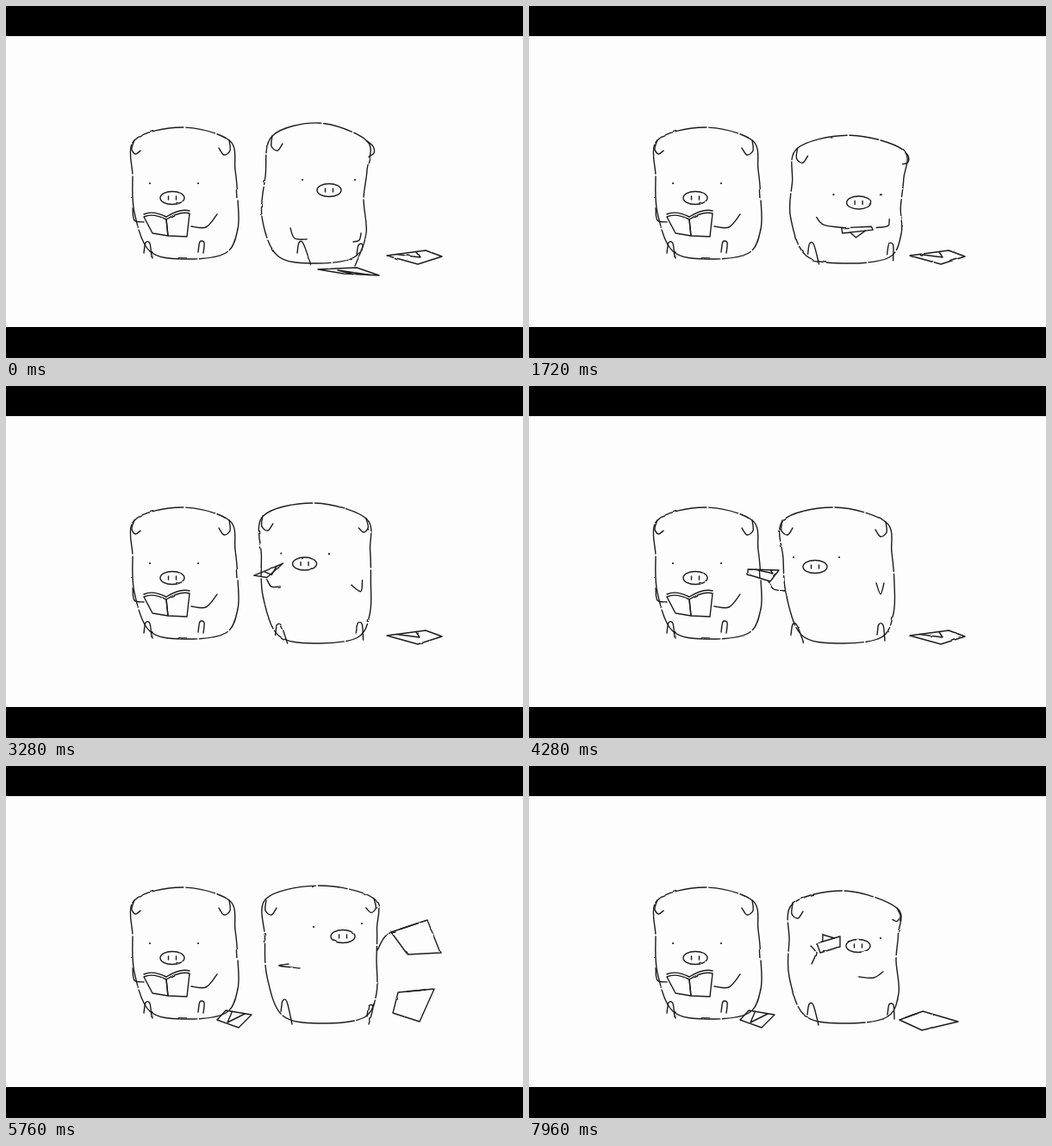
Animation, 600 px wide and 409 px high, one loop 8 s. Source, as an HTML page:

```html
<!DOCTYPE html>
<html lang="en">
<head>
<meta charset="utf-8">
<title>Two pigs and a paper plane</title>
<style>
html, body { margin: 0; width: 100%; height: 100%; overflow: hidden; background: #000; }
svg { display: block; width: 100vw; height: 100vh; }
.ink { fill: none; stroke: #1c1c1c; stroke-width: 1.4; stroke-linecap: round; stroke-linejoin: round; }
.body { stroke-dasharray: 60 3 34 2.6 85 3; }
.dot { fill: #1c1c1c; stroke: none; }
</style>
</head>
<body>
<svg viewBox="0 0 600 409">
  <defs>
    <filter id="rough" filterUnits="userSpaceOnUse" x="0" y="0" width="600" height="409" color-interpolation-filters="sRGB">
      <feTurbulence type="fractalNoise" baseFrequency=".08" numOctaves="2" seed="4"/>
      <feDisplacementMap in="SourceGraphic" scale="2" xChannelSelector="R" yChannelSelector="G"/>
    </filter>
    <filter id="boil" filterUnits="userSpaceOnUse" x="0" y="0" width="600" height="409" color-interpolation-filters="sRGB">
      <feTurbulence id="noise" type="fractalNoise" baseFrequency=".08" numOctaves="2" seed="1"/>
      <feDisplacementMap in="SourceGraphic" scale="2" xChannelSelector="R" yChannelSelector="G"/>
    </filter>
  </defs>
  <rect y="35" width="600" height="338" fill="#fdfdfd"/>
  <g class="ink">
    <g id="reader" filter="url(#rough)"></g>
    <g id="fallen"></g>
    <g id="folder" filter="url(#boil)"></g>
  </g>
</svg>
<script>
const $ = id => document.getElementById(id);
const parse = s => s.split(' ').map(p => p.split(',').map(Number));
const lerp = (a, b, u) => a.map((v, i) => v + (b[i] - v) * u);
const add = ([x, y], dx, dy) => [x + dx, y + dy];
const path = (d, cls = '') => `<path class="${cls}" d="${d}"/>`;
const poly = pts => 'M' + pts.join('L');

// Catmull-Rom spline through the points
function curve(pts, closed) {
  const n = pts.length;
  const at = i => pts[closed ? (i + n) % n : Math.max(0, Math.min(n - 1, i))];
  let d = 'M' + pts[0];
  for (let i = 0; i < (closed ? n : n - 1); i++) {
    const [a, b, c, e] = [at(i - 1), at(i), at(i + 1), at(i + 2)];
    const c1 = b.map((v, k) => v + (c[k] - a[k]) / 6);
    const c2 = c.map((v, k) => v - (e[k] - b[k]) / 6);
    d += `C${c1} ${c2} ${c}`;
  }
  return d;
}

// Outline from the top corners, the waist and the left and right hips
function outline([tl, tr, waist, [left, right]], floor) {
  const hip = [left, floor - 54];
  return curve([
    tl, [(tl[0] + tr[0]) / 2, Math.min(tl[1], tr[1]) - 15], tr,
    add(lerp(tr, waist, .5), 2, 0), waist,
    [right, floor - 35], [right - 14, floor - 7], [(left + right) / 2, floor], [left + 18, floor - 9],
    hip, add(lerp(tl, hip, .5), -2, 0)
  ], true);
}

// An ear hooks inward (out = 0) or bulges outward (out = 1)
function ear(c, side, out) {
  const hook = [[0, 0], [1, 12], [-6, 17], [-12, 9]];
  const bulge = [[0, 0], [7, 6], [8, 14], [2, 18]];
  return curve(hook.map((p, i) => lerp(p, bulge[i], out)).map(([x, y]) => add(c, side * x, y)));
}

const leg = (knee, foot) => curve([add(knee, -4, 13), add(knee, -2, 1), add(knee, 3, 2), foot]);

// Four corners and the tip of a flap on the first edge
const sheet = ([a, b, c, d, flap]) =>
  path(poly([a, b, c, d, a])) + path(poly([lerp(a, b, .25), flap, lerp(a, b, .75)]));

function face([eyeL, eyeR, [x, y]]) {
  const eye = ([cx, cy]) => `<circle class="dot" cx="${cx}" cy="${cy}" r="1.1"/>`;
  return eye(eyeL) + eye(eyeR) + `<ellipse cx="${x}" cy="${y}" rx="14" ry="7.5"/>` +
    path(`M${x - 4.5} ${y - 2}v4m9 0v-4`.replace('m9 0', `M${x + 4.5} ${y + 2}`));
}

function pig({ body, ears, arms, legs, look }, floor) {
  const [c, [outL, outR]] = ears;
  return path(outline(body, floor), 'body') +
    path(ear(c, -1, outL)) + path(ear(body[1], 1, outR)) +
    path(curve(arms.slice(0, 3))) + path(curve(arms.slice(3))) +
    path(leg(legs[0], legs[1])) + path(leg(legs[2], legs[3])) + face(look);
}

function book(top, foot) {
  const page = (corner, heel) => {
    const [x, y] = lerp(top, corner, .6);
    const edge = lift => `M${add(top, 0, -lift)}Q${x} ${y - 6 - lift} ${add(corner, 0, -lift)}`;
    return path(`${edge(0)}L${heel}L${foot}L${top}`) + path(edge(3));
  };
  return page([160, 245], [170, 264]) + page([213, 241], [210, 268]);
}

const make = fields => Object.fromEntries(Object.entries(fields).map(([k, s]) => [k, parse(s)]));

const reader = make({
  body: '149,156 259,156 269,225 149,269',
  ears: '149,156 0.35,0',
  arms: '147,235 149,249 160,251 215,256 232,257 245,242',
  legs: '164,274 169,293 227,273 229,287',
  look: '167,206 223,206 193,223'
});

const flat = '487,284 442,290 478,300 506,291 480,292';
const open = '457,285 430,295 456,307 498,297 443,290';

// Each prop runs from its right end to its left end, so that poses blend cleanly
const poses = {
  sit: make({
    body: '309,151 419,157 415,225 297,418',
    ears: '309,151 0,1',
    arms: '330,258 335,270 349,271 403,274 410,272 412,264',
    legs: '342,274 354,301 411,277 405,302',
    look: '343,202 405,202 375,214',
    prop: '433,313 392,311 362,306 407,304 385,307',
    loose: flat
  }),
  reach: make({
    body: '313,172 432,184 418,248 294,413',
    ears: '325,178 0,0.8',
    arms: '345,277 360,291 384,299 359,260 385,262 413,257',
    legs: '324,282 344,300 422,276 416,291',
    look: '358,231 417,227 383,242',
    prop: '410,313 375,300 383,294 414,298 390,303',
    loose: flat
  }),
  aim: make({
    body: '306,156 426,160 422,228 297,421',
    ears: '306,156 0,0.8',
    arms: '330,227 334,234 339,229 396,243 420,238 417,226',
    legs: '335,278 343,299 415,272 418,293',
    look: '346,196 407,198 378,209',
    prop: '364,199 347,239 335,231 326,221 335,231',
    loose: flat
  }),
  poke: make({
    body: '295,156 414,158 424,230 299,423',
    ears: '294,156 0,0',
    arms: '278,227 284,236 297,238 403,229 408,242 412,229',
    legs: '308,276 319,299 408,276 413,296',
    look: '307,199 360,199 332,210',
    prop: '290,214 254,213 254,219 280,227 284,218',
    loose: flat
  }),
  lift: make({
    body: '302,154 427,154 430,225 303,430',
    ears: '302,156 0,0.2',
    arms: '341,235 317,232 328,230 431,214 440,198 452,193',
    legs: '323,272 332,300 423,278 421,300',
    look: '357,187 413,183 391,198',
    prop: '489,179 447,193 466,219 504,217 468,186',
    loose: '497,259 455,263 449,287 480,297 476,261'
  }),
  fold: make({
    body: '312,166 435,168 432,235 304,433',
    ears: '312,166 0,0.8',
    arms: '334,247 343,256 368,260 420,248 416,257 402,260',
    legs: '327,275 336,300 420,276 423,296',
    look: '354,221 408,221 383,230',
    prop: '402,265 365,266 365,260 403,259 383,272',
    loose: open
  }),
  show: make({
    body: '306,160 427,165 426,226 302,429',
    ears: '306,160 0,0.5',
    arms: '327,209 333,217 328,230 383,245 400,246 411,239',
    legs: '327,276 336,301 420,276 424,294',
    look: '352,200 408,200 382,209',
    prop: '361,198 334,206 338,217 361,210 341,196',
    loose: open
  })
};
poses.crease = { ...poses.fold, loose: poses.sit.loose };
poses.drop = { ...poses.poke, prop: poses.poke.loose };

// Stretch the pig upward and push the prop and its arm sideways
function bend(base, up, push) {
  const lift = ([x, y]) => [x, y - up * Math.max(0, 298 - y) / 160];
  const out = { ...base };
  for (const k of ['body', 'arms', 'look', 'prop']) out[k] = base[k].map(lift);
  out.ears = [lift(base.ears[0]), base.ears[1]];
  out.prop = out.prop.map(p => add(p, push, 0));
  out.arms = out.arms.map((p, i) => i < 3 ? add(p, push, 0) : p);
  return out;
}

// Pose, stretch, push, first and last new drawing, number of drawings
const acts = [
  ['sit', 0, 0, 0],
  ['reach', 0, 0, 840, 1120, 4],
  ['crease', 0, 0, 1240, 1600, 4],
  ['aim', 0, 0, 1720, 2240, 6],
  ['aim', 7, 0, 2360, 2480, 2],
  ['poke', 5, 12, 2840, 3640, 8],
  ['poke', 3, 7, 3720],
  ['poke', 1, 0, 3960],
  ['poke', 1, 8, 4120],
  ['poke', 0, 0, 4280],
  ['poke', 1, 8, 4440],
  ['poke', 0, 0, 4560],
  ['drop', 0, 0, 4760],
  ['lift', 0, 0, 5320, 5760, 5],
  ['fold', 10, 0, 5840, 6080, 3],
  ['fold', 0, 0, 6200, 6840, 6],
  ['fold', 2, 0, 6960],
  ['fold', 0, 0, 7080],
  ['show', 12, 0, 7400, 7640, 3],
  ['show', 0, 0, 7960]
].map(([name, up, push, from, to = from, count = 1]) => ({
  shape: bend(poses[name], up, push),
  times: Array.from({ length: count }, (_, i) =>
    from + 40 * Math.round((to - from) * i / Math.max(1, count - 1) / 40))
}));

function blend(a, b, u) {
  const out = {};
  for (const k in a) out[k] = a[k].map((p, i) => lerp(p, b[k][i], u));
  return out;
}

function shapeAt(t) {
  let shape, last = acts[0].shape, steps = 0;
  for (const { shape: goal, times } of acts) {
    const done = times.filter(x => x <= t).length;
    if (!done) break;
    const u = done / times.length;
    shape = blend(last, goal, u * u * (3 - 2 * u));
    last = goal;
    steps += done;
  }
  return { shape, steps };
}

let shown = -1;
function draw(t) {
  const fall = t < 4760 ? null : t < 4840 ? 52 : t < 4960 ? 20 : 0;
  $('fallen').style.display = fall === null ? 'none' : '';
  $('fallen').setAttribute('transform', `translate(${(fall || 0) / 12} ${-(fall || 0)})`);

  const { shape, steps } = shapeAt(t);
  if (steps === shown) return;
  shown = steps;
  $('noise').setAttribute('seed', steps);
  $('folder').innerHTML = sheet(shape.loose) + pig(shape, 299) + sheet(shape.prop);
}

$('reader').innerHTML = pig(reader, 294) + book([186, 248], [188, 267]);
$('fallen').innerHTML = sheet(parse('285,289 255,284 245,295 270,304 257,298'));

const begin = performance.now();
function tick() {
  draw((performance.now() - begin) % 8000);
  requestAnimationFrame(tick);
}
tick();
</script>
</body>
</html>
```
